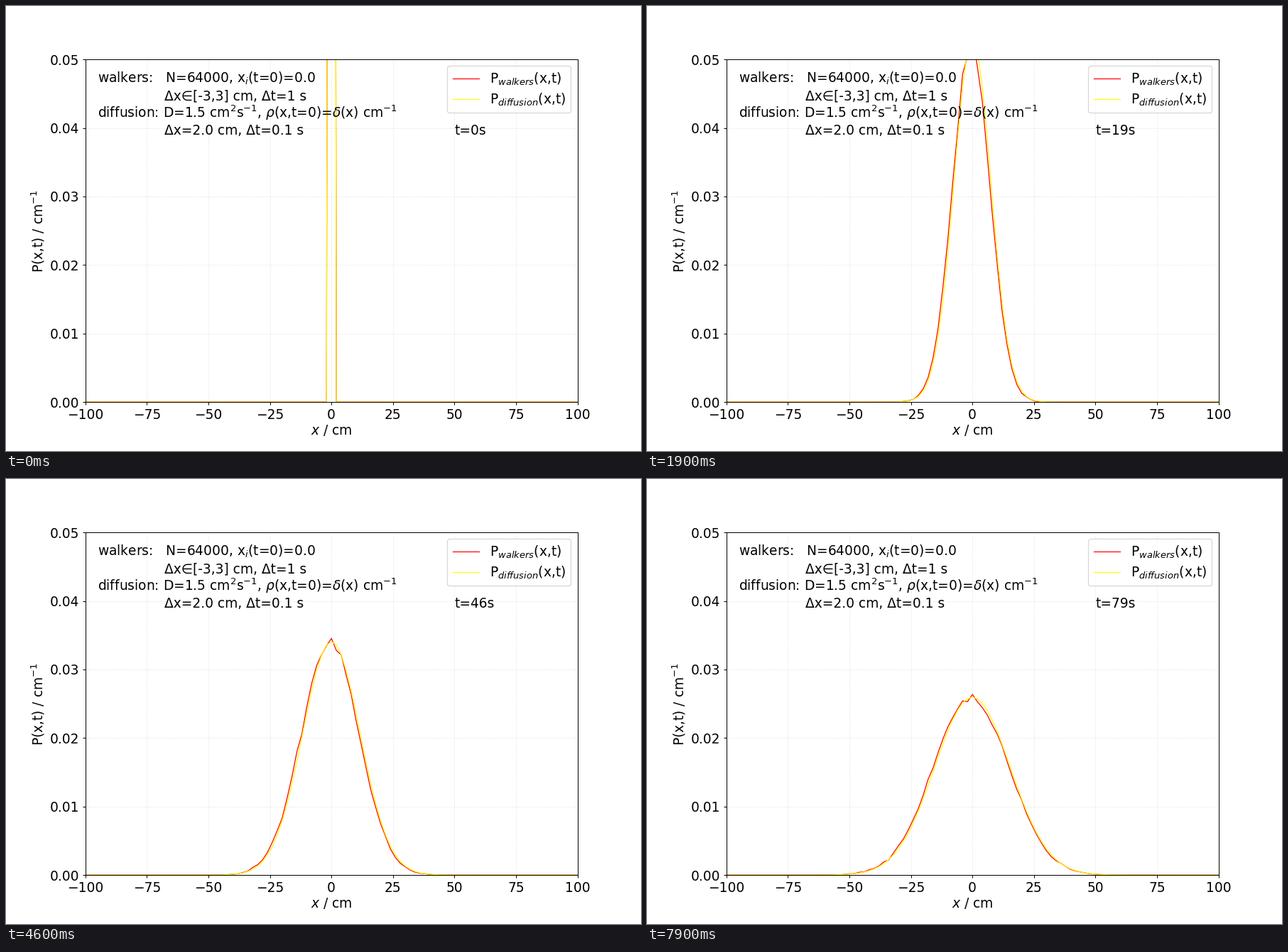
Write a matplotlib script that moves like this. It is 894x626 px and loops after 8 s.

```python
import math

import matplotlib.pyplot as plt
import numpy as np
from matplotlib.animation import FuncAnimation

W, H, DPI = 894, 626, 89.4
STEPS = 80
N = 64000
D, DX, DT = 1.5, 2.0, 0.1

plt.rcParams.update({"font.family": "DejaVu Sans", "font.size": 15,
                     "mathtext.fontset": "dejavusans"})

x = np.arange(-100, 101, DX)


def diffuse():
    """Explicit finite-difference solution, one row per second."""
    p = np.where(x == 0, 1 / DX, 0.0)
    rows = []
    for _ in range(STEPS):
        rows.append(p.copy())
        for _ in range(round(1 / DT)):
            p[1:-1] += D * DT / DX**2 * (p[2:] - 2 * p[1:-1] + p[:-2])
    return np.array(rows)


def walk():
    """Binned density of the walkers with counting noise, one row per second."""
    t = np.maximum(np.arange(STEPS), 1e-3)[:, None]
    erf = np.vectorize(math.erf)

    def cdf(edge):
        return 0.5 * (1 + erf(edge / np.sqrt(4 * D * t)))

    p = (cdf(x + 1.5) - cdf(x - 0.5)) / DX
    noise = np.random.default_rng(7).normal(size=(STEPS + 2, x.size))
    noise = (noise[:-2] + noise[1:-1] + noise[2:]) / math.sqrt(3)
    ripple = 0.018 * np.cos(np.pi * x / 2) * np.exp(-np.abs(x) / 4)
    return np.maximum(p * (1 + ripple) + 0.6 * noise * np.sqrt(p / (DX * N)), 0)


density, walkers = diffuse(), walk()

# The small margin keeps the pixel size from being rounded down
fig, ax = plt.subplots(figsize=((W + 1e-6) / DPI, (H + 1e-6) / DPI), dpi=DPI)
fig.subplots_adjust(left=0.125, right=0.9, bottom=0.11, top=0.88)
ax.set(xlim=(-100, 100), ylim=(0, 0.05), xticks=np.arange(-100, 101, 25),
       yticks=np.arange(6) / 100)
ax.set_xlabel("$x$ / cm", labelpad=2)
ax.set_ylabel("P(x,t) / cm$^{-1}$")
ax.grid(linestyle=":", alpha=0.4)

walk_line, = ax.plot(x, walkers[0], color="red", lw=1,
                     label="P$_{walkers}$(x,t)")
diff_line, = ax.plot(x, density[0], color="yellow", lw=1,
                     label="P$_{diffusion}$(x,t)")
ax.legend(loc="upper right", labelspacing=0.34)

indent = " " * 16
notes = [
    "walkers:   N=64000, x$_i$(t=0)=0.0",
    indent + "Δx∈[-3,3] cm, Δt=1 s",
    r"diffusion: D=1.5 cm$^2$s$^{-1}$, $\rho$(x,t=0)=$\delta$(x) cm$^{-1}$",
    indent + "Δx=2.0 cm, Δt=0.1 s",
]
for i, note in enumerate(notes):
    ax.text(-95, 0.039 + 0.00254 * (3 - i), note)
clock = ax.text(50, 0.039, "t=0s")


def update(t):
    walk_line.set_ydata(walkers[t])
    diff_line.set_ydata(density[t])
    clock.set_text(f"t={t}s")
    return walk_line, diff_line, clock


anim = FuncAnimation(fig, update, frames=STEPS, interval=100, repeat=True)
plt.show()
```
